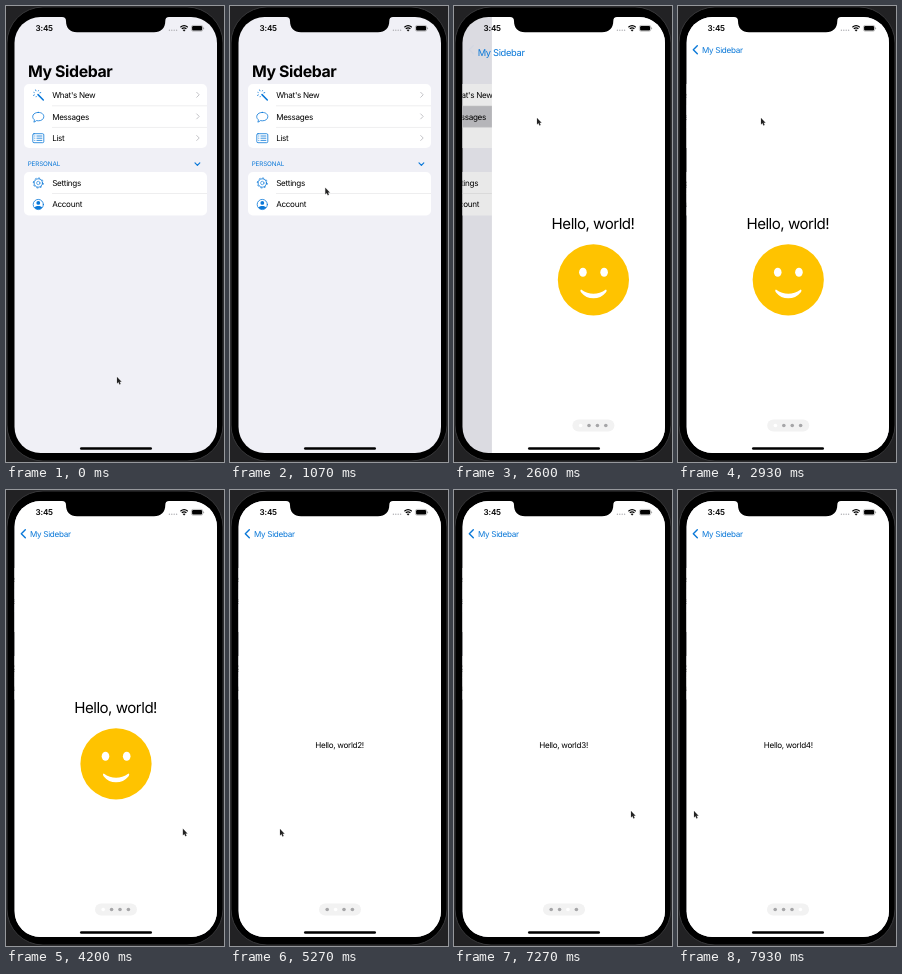
Write an HTML page that moves like this. It is 218 by 456 pixels and loops after 8000 ms.

```html
<!DOCTYPE html>
<html lang="en">
<head>
<meta charset="utf-8">
<title>Sidebar navigation</title>
<style>
  html, body { margin: 0; width: 100%; height: 100%; overflow: hidden; background: #222224; }
  svg { display: block; width: 100%; height: 100%; }
  text { font-family: Inter, Roboto, sans-serif; font-size: 8.1px; letter-spacing: -.3px; text-rendering: geometricPrecision; }
  .large { font-size: 15.9px; font-weight: 700; letter-spacing: -.4px; }
  .header { font-size: 6.3px; letter-spacing: -.12px; fill: #0a78d8; }
  .hello { font-size: 15.1px; letter-spacing: -.5px; }
  .time { font-weight: 600; letter-spacing: -.2px; }
  .mid { text-anchor: middle; }
  .blue { fill: #0a78d8; }
  .line { fill: none; stroke: #0a78d8; stroke-width: .8; stroke-linecap: round; stroke-linejoin: round; }
  .grey { fill: none; stroke: #c4c4c8; stroke-linecap: round; stroke-linejoin: round; }
  .rule { stroke: #dcdcdf; stroke-width: .5; }
</style>
</head>
<body>
<svg viewBox="0 0 218 456">
  <defs>
    <clipPath id="screen"><rect x="8.5" y="11" width="202.5" height="436" rx="26"/></clipPath>
  </defs>
  <rect x="1" y="1" width="216" height="454" rx="36" stroke="#38383a"/>

  <g clip-path="url(#screen)">
    <rect x="8" y="11" width="204" height="437" fill="#f0f0f6"/>
    <g id="sidebar">
      <rect x="18" y="78" width="183" height="64" rx="5" fill="#fff"/>
      <rect id="highlight" x="18" y="100" width="183" height="21.3" fill="#c6c6ca"/>
      <rect x="18" y="166" width="183" height="43.5" rx="5" fill="#fff"/>
      <g id="rows"></g>
      <text class="header" x="21.7" y="160">PERSONAL</text>
      <path class="line" style="stroke-width:1.2" d="M189 156.9l2.4 2.4 2.4 -2.4"/>

      <g id="wand" transform="translate(31 87.6)">
        <path class="line" style="stroke-width:1.5" d="M1 1L6.3 6.4"/>
      </g>
      <path class="line" d="M32.3 106.4C36 106.4 37.8 108.4 37.8 110.6S36 114.8 32.3 114.8L30.4 114.6Q29 116 27.8 116.1Q28.6 115 28.3 113.7C25 111 27 106.4 32.3 106.4Z"/>
      <g id="list"><rect class="line" x="26.8" y="127.7" width="11" height="9" rx="1.2"/></g>
      <g transform="translate(32.3 177)">
        <circle class="line" r="4.2"/>
        <circle class="line" r="5" pathLength="24" style="stroke-dasharray:1.5;stroke-linecap:butt"/>
        <circle class="line" r="1.7" style="stroke-width:.6"/>
      </g>
      <g transform="translate(32.3 198.5)">
        <circle class="line" r="5.1"/>
        <circle class="blue" cy="-1.6" r="1.9"/>
        <path class="blue" d="M-4 3.2C-3 .9 3 .9 4 3.2Q0 6.4 -4 3.2Z"/>
      </g>
    </g>
    <rect id="dim" x="8" y="11" width="204" height="437" opacity="0"/>

    <g id="detail">
      <rect x="8.5" y="11" width="204" height="437" fill="#fff"/>
      <g id="pages">
        <text class="hello mid" x="109.6" y="223.3">Hello, world!</text>
        <g transform="translate(110 273.8)" fill="#fff">
          <circle r="35.6" fill="#ffc300"/>
          <ellipse cx="-10.5" cy="-7.5" rx="3.8" ry="4.5"/>
          <ellipse cx="10.7" cy="-7.5" rx="3.8" ry="4.5"/>
          <path d="M-12.3 9.6Q0 18.4 12.5 9.6Q14 10.4 12.4 12.6Q7.5 18.5 0 18.5T-12.2 12.6Q-13.8 10.4 -12.3 9.6Z"/>
        </g>
      </g>
      <rect x="89" y="413.5" width="42" height="12" rx="6" fill="#f2f2f2"/>
      <g id="dots"></g>
    </g>

    <text id="title" class="large">My Sidebar</text>
    <text id="back" class="blue">My Sidebar</text>
    <path id="chevron" class="line" style="stroke-width:1.4" d="M19.3 39.7l-4 4 4 4"/>

    <text class="time" x="29.6" y="25.2">3:45</text>
    <g id="signal" fill="#b0b0b4"></g>
    <path d="M174.4 21.2Q178.1 18.1 181.8 21.2M175.8 22.8Q178.1 20.9 180.4 22.8" fill="none" stroke="#000" stroke-width="1.2"/>
    <path d="M178.1 25.6L176.7 24.1Q178.1 23 179.5 24.1Z"/>
    <rect x="185.4" y="19.4" width="11.4" height="5.8" rx="1.7" fill="none" stroke="#888" stroke-width=".5"/>
    <rect x="186.1" y="20.1" width="10" height="4.4" rx="1.1"/>
    <rect x="197.3" y="21.4" width=".8" height="1.8" rx=".4" fill="#888"/>
    <rect x="74" y="441.2" width="72" height="2.6" rx="1.3"/>
    <path d="M56 10V11Q60 11 60 15C60 22 64 26.3 71 26.3H148C155 26.3 159.3 22 159.3 15Q159.3 11 163 11V10Z"/>
  </g>

  <path id="cursor" d="M0 0V6.4L1.4 5.1 2.5 7.5 3.6 7 2.6 4.7H4.5Z" fill="#222" stroke="#ccc" stroke-width=".6" paint-order="stroke"/>
</svg>
<script>
const LOOP = 8000, PAGE_WIDTH = 203, PUSH_AT = 2400;
const $ = id => document.getElementById(id);
const repeat = (count, make) => Array.from({ length: count }, (_, i) => make(i)).join("");
const add = (id, markup) => $(id).insertAdjacentHTML("beforeend", markup);
const clamp = v => Math.min(1, Math.max(0, v));

// Each swipe: when it starts and where the pointer ends up
const swipes = [{ at: 4480, x: 50 }, { at: 6090, x: -12 }, { at: 7470, x: 16 }];

const glides = [
  { from: 70, to: 870, x: 97, y: 195 },
  { from: 930, to: 1470, x: 87, y: 117 },
  { from: 1730, to: 2130, x: 83, y: 112 },
  // The pointer goes back to the right before every swipe
  ...swipes.flatMap(({ at, x }, i) => {
    const y = 339 - 9 * i;
    return [{ from: at - 800, to: at - 270, x: 177, y }, { from: at, to: at + 260, x, y }];
  })
];

function pointer(time) {
  let x = 111, y = 371;
  for (const glide of glides) {
    const u = clamp((time - glide.from) / (glide.to - glide.from));
    const eased = u * u * (3 - 2 * u);
    x += (glide.x - x) * eased;
    y += (glide.y - y) * eased;
  }
  return [x, y];
}

// Critically damped spring from 0 to 1
function spring(elapsed) {
  const k = 17 * Math.max(0, elapsed) / 1000;
  return 1 - Math.exp(-k) * (1 + k);
}

function move(el, x, y = 0, scale = 1) {
  el.setAttribute("transform", `translate(${x} ${y}) scale(${scale})`);
}
const fade = (id, opacity) => $(id).setAttribute("opacity", clamp(opacity));

function addSection(top, labels, hasChevron) {
  add("rows", labels.map((label, i) => {
    const y = top + 21.6 * i;
    return `<text x="46.2" y="${y + 3}">${label}</text>` +
      (i ? `<path class="rule" d="M46 ${y - 10.8}H201"/>` : "") +
      (hasChevron ? `<path class="grey" d="M190.7 ${y - 2.7}l2.5 2.5 -2.5 2.5"/>` : "");
  }).join(""));
}
addSection(89, ["What's New", "Messages", "List"], true);
addSection(176.7, ["Settings", "Account"], false);

add("wand", repeat(6, i => `<path class="line" transform="rotate(${105 + i * 48})" d="M3 0h${i % 2 ? .9 : .3}"/>`));
add("list", repeat(3, i => `<path class="line" d="M28.7 ${130 + i * 2.2}h.2m2 0h5"/>`));
add("signal", repeat(4, i => `<circle cx="${163.4 + i * 2.4}" cy="24.2" r=".7"/>`));
add("dots", repeat(4, i => `<circle cx="${97.2 + i * 8.4}" cy="419.5" r="1.8"/>`));
add("pages", repeat(3, i => `<text class="mid" x="${109.6 + (i + 1) * PAGE_WIDTH}" y="257.8">Hello, world${i + 2}!</text>`));
const dots = [...$("dots").children];

function draw(time) {
  const push = spring(time - PUSH_AT);
  move($("sidebar"), -PAGE_WIDTH * .293 * push);
  move($("detail"), PAGE_WIDTH * (1 - push));
  fade("dim", .1 * push);
  fade("highlight", time >= PUSH_AT ? 1 : 0);

  // The large title shrinks into the back label
  const x = 22 + 2 * push, y = 71.4 - 24.5 * push, scale = 2.07 - 1.07 * push;
  move($("title"), x, y, scale / 2.07);
  move($("back"), x, y, scale);
  fade("title", 1 - push * 2);
  fade("back", push * 2 - .6);
  fade("chevron", (push - .85) / .15);

  const page = swipes.reduce((sum, swipe) => sum + spring(time - swipe.at), 0);
  move($("pages"), -page * PAGE_WIDTH);
  dots.forEach((dot, i) => dot.setAttribute("fill", i === Math.round(page) ? "#fff" : "#a6a6a8"));
  move($("cursor"), ...pointer(time));
}

const start = performance.now();
function tick() {
  draw((performance.now() - start) % LOOP);
  requestAnimationFrame(tick);
}
tick();
</script>
</body>
</html>
```
